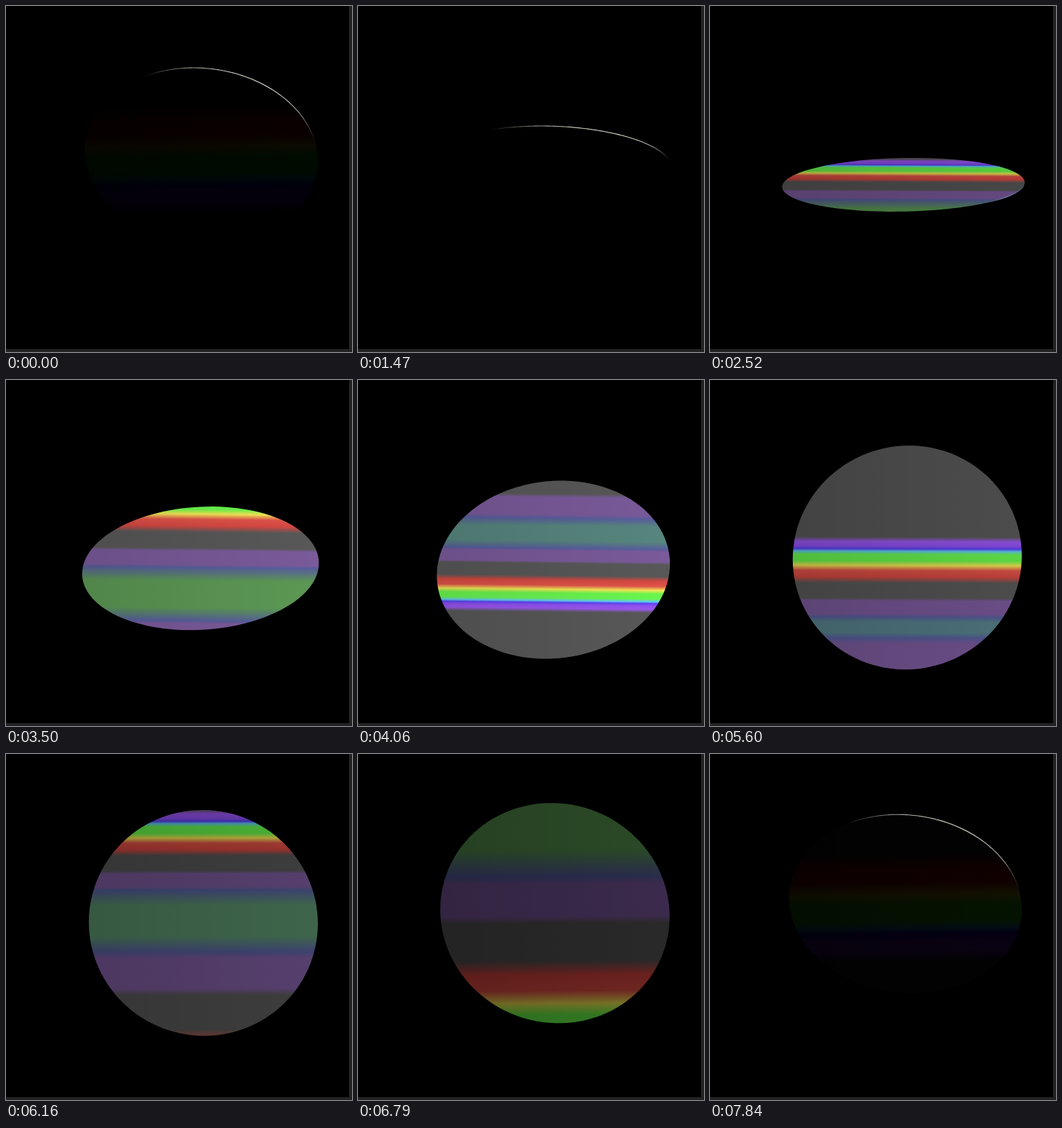
An HTML page with a canvas for the animation above (7910 ms loop, 476x476 px).

```html
<!DOCTYPE html>
<html lang="en">
<head>
<meta charset="utf-8">
<title>Turning disc</title>
<style>
html, body { margin: 0; width: 100%; height: 100%; overflow: hidden; background: #000; }
canvas { display: block; width: 100vw; height: 100vh; }
</style>
</head>
<body>
<canvas id="stage" width="476" height="476"></canvas>
<script>
const ctx = document.getElementById('stage').getContext('2d');
const LOOP = 7910, EDGE_ON = 2040, SIZE = 476;

// Spans in which the picture moves on only every 280 ms instead of 70.
const SLOW = [[140, 1540], [1960, 2240], [6510, 6790], [7000, LOOP]];

// The opening of the disc: time, half height.
const OPENING = [
  [0, 121], [1470, 43], [EDGE_ON, 1], [2520, 37], [3500, 85],
  [4060, 122.5], [5040, 148], [5880, 157], [6790, 151.5], [LOOP, 121]
];

const GRAY = [88, 88, 88], PURPLE = [122, 90, 154], BLUE = [88, 94, 156];
const TEAL = [86, 128, 138], GREEN = [92, 152, 84];
const RAINBOW = [
  [0, GRAY], [.1, [155, 88, 240]], [.2, [145, 80, 240]], [.26, [90, 68, 245]],
  [.31, [100, 205, 245]], [.38, [106, 246, 84]], [.52, [106, 246, 76]],
  [.62, [244, 232, 86]], [.73, [224, 84, 74]], [.87, [214, 72, 66]], [1, GRAY]
];

const { sin, cos, min, max, PI } = Math;
const lerp = (a, b, p) => a + (b - a) * p;
const clamp = (v, lo = 0, hi = 1) => min(hi, max(lo, v));
const rad = deg => deg * PI / 180;

function opening(t) {
  const i = OPENING.findIndex(k => k[0] > t);
  const [t0, h0] = OPENING[i - 1], [t1, h1] = OPENING[i];
  return lerp(h0, h1, (t - t0) / (t1 - t0));
}

// Degrees turned since the disc was seen edge-on, 0 to 360.
const turned = t => (t - EDGE_ON + LOOP) % LOOP / LOOP * 360;

function pose(t) {
  const q = rad(turned(t)), h = opening(t), skew = -8 * sin(q);
  return {
    x: 268.7 - 2.8 * cos(q),
    y: 236 + 27.5 * sin(q) - 2.5 * sin(q) ** 2,
    a: 161.5 + 5 * cos(q) + cos(2 * q),
    b: Math.sqrt(max(.2, h * h - skew * skew)),
    h, skew
  };
}

// One side of the fold: blue, purple, gray, then a rainbow from red to violet.
function side(fold, dir, blue, scale) {
  const pos = d => fold + dir * (blue + d * scale);
  return [
    [pos(0), BLUE], [pos(.06), PURPLE], [pos(.34), PURPLE], [pos(.4), GRAY],
    ...RAINBOW.map(([f, c]) => [pos(lerp(1.7, .72, f)), c]).reverse()
  ];
}

// Bands mirrored about a fold; positions in half heights from the centre.
function sweep(fold, blue, above, below) {
  const tint = clamp((blue - .1) / .3);
  const mid = TEAL.map((v, i) => lerp(v, GREEN[i], tint));
  return [
    ...side(fold, -1, blue, above).reverse(),
    [fold - blue / 2, mid], [fold + blue / 2, mid],
    ...side(fold, 1, blue, below)
  ];
}

function bands(t) {
  const list = [];
  if (t >= EDGE_ON && t < 5700) {
    const s = (t - 3500) / 1000, f = .42 - 1.25 * s - .41 * s * s;
    list.push(...sweep(f, max(.05, .3 + .32 * f), max(.4, .74 + .12 * f), max(.4, .53 + .27 * f)));
  }
  if (t > 4060 || t < EDGE_ON) {
    const s = ((t < EDGE_ON ? 7840 : t) - 5600) / 1000, f = .625 - 1.083 * s - .117 * s * s;
    list.push(...sweep(f, max(.05, .27 - .28 * f), .42, .953 - .117 * f));
  }
  return list;
}

function path(d, from, to) {
  ctx.beginPath();
  for (let i = 0; i <= 120; i++) {
    const q = rad(lerp(from, to, i / 120));
    ctx.lineTo(d.x + d.a * cos(q), d.y + d.skew * cos(q) + d.b * sin(q));
  }
}

function fade(d, from, to, stops) {
  const g = ctx.createLinearGradient(d.x + from * d.a, 0, d.x + to * d.a, 0);
  stops.forEach(([p, c]) => g.addColorStop(p, c));
  return g;
}

function drawFace(d, t, light) {
  const range = 5;
  const shade = v => Math.round(max(0, v * light - 9 * (1 - light)));
  ctx.save();
  path(d, 0, 360);
  ctx.clip();
  ctx.save();
  ctx.transform(1, -.0015 * d.skew, 0, 1, d.x, d.y);
  const g = ctx.createLinearGradient(0, -range * d.h, 0, range * d.h);
  for (const [v, c] of bands(t)) {
    g.addColorStop(clamp((v + range) / (2 * range)), `rgb(${c.map(shade)})`);
  }
  ctx.fillStyle = g;
  ctx.fillRect(-240, -240, 480, 480);
  ctx.restore();
  const dim = .12 + .3 * (1 - light) ** 4;
  ctx.fillStyle = fade(d, -1, 1, [[0, `rgba(0,0,0,${dim})`], [1, 'rgba(0,0,0,0)']]);
  ctx.fillRect(0, 0, SIZE, SIZE);
  ctx.restore();
}

function drawRim(d, from, to, paint, alpha) {
  ctx.globalAlpha = alpha;
  ctx.strokeStyle = paint;
  ctx.lineWidth = 1.1;
  path(d, from, to);
  ctx.stroke();
  ctx.globalAlpha = 1;
}

function draw(t) {
  const d = pose(t), angle = turned(t);
  ctx.fillStyle = '#000';
  ctx.fillRect(0, 0, SIZE, SIZE);

  const light = clamp(1.04 * cos(rad(angle - 96) / 2));
  if (light > 0) drawFace(d, t, light);

  const rim = clamp((angle - 250) / 12), glint = .7 * cos(rad(angle * 1.1));
  if (rim > 0) {
    const c = a => `rgba(228,228,216,${a})`;
    drawRim(d, -120, -6, fade(d, -.5, .98, [
      [0, c(0)], [.3, c(.7)], [.7, c(1)], [.9, c(.7)], [1, c(0)]
    ]), rim);
  } else if (glint > 0) {
    const tone = angle < 45 ? '150,205,250' : '215,250,160';
    drawRim(d, 6, 48, fade(d, .65, 1, [
      [0, `rgba(${tone},0)`], [.6, `rgba(${tone},1)`], [1, `rgba(${tone},.3)`]
    ]), glint);
  }

  ctx.fillStyle = '#222';
  ctx.fillRect(472, 0, 4, SIZE);
  ctx.fillRect(0, 472, SIZE, 4);
}

function snap(t) {
  const slow = SLOW.find(([from, to]) => t >= from && t < to);
  const [from, step] = slow ? [slow[0], 280] : [0, 70];
  return from + Math.floor((t - from) / step) * step;
}

const start = performance.now();
let shown = -1;
function tick() {
  const t = snap((performance.now() - start) % LOOP);
  if (t !== shown) draw(shown = t);
  requestAnimationFrame(tick);
}
tick();
</script>
</body>
</html>
```
